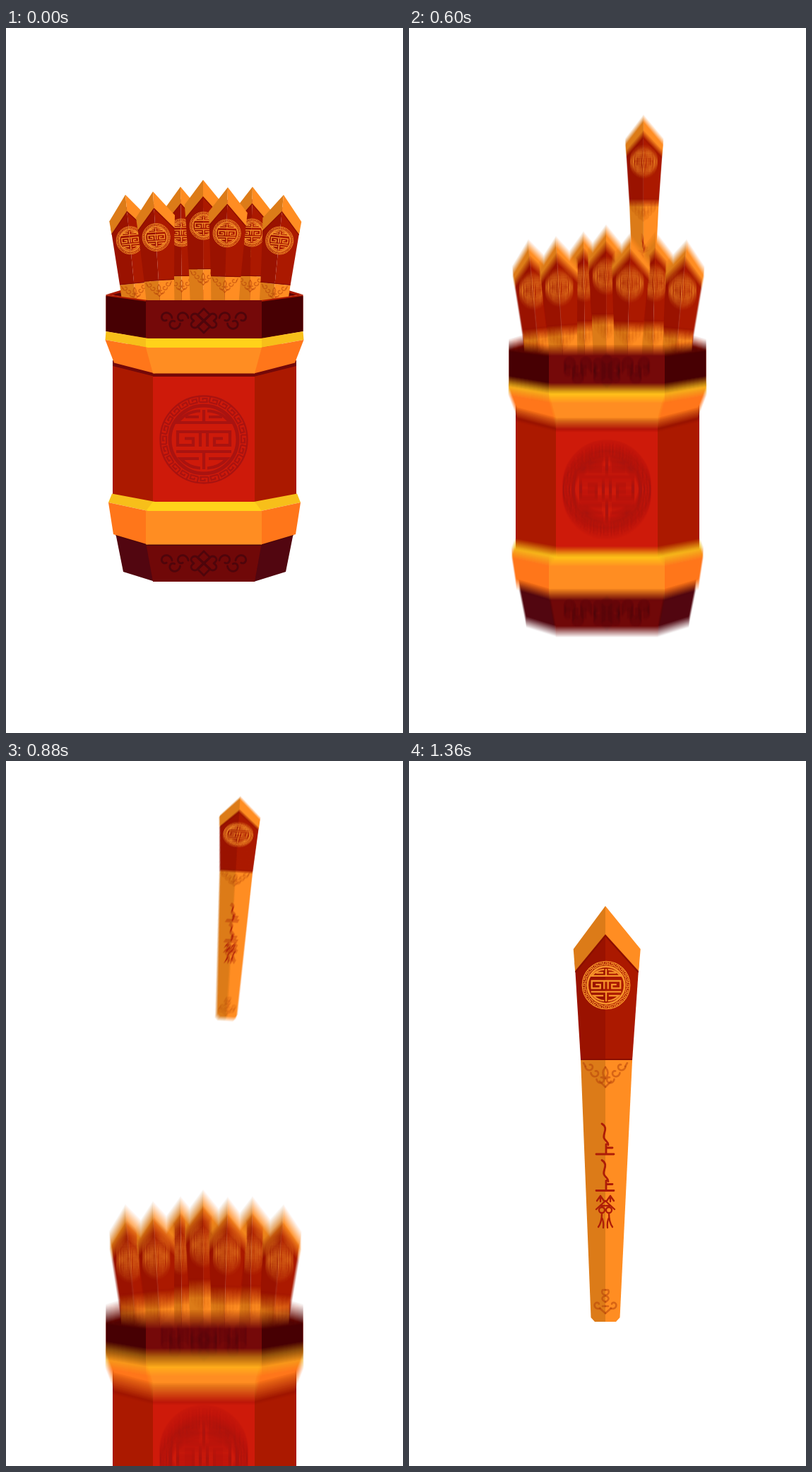
Animation of 562 by 997 pixels, one loop 2400 ms. Source, as an HTML page with a canvas:

```html
<!DOCTYPE html>
<html lang="zh">
<head>
<meta charset="utf-8">
<title>Fortune sticks</title>
<style>
html, body { margin: 0; width: 100%; height: 100%; overflow: hidden; background: #fff; }
canvas { display: block; width: 562px; height: 997px; }
</style>
</head>
<body>
<canvas id="stage" width="562" height="997" role="img" aria-label="上上簽"></canvas>
<script>
const W = 562, H = 997, LOOP = 2400, STEP = 40, SHUTTER = 20, SAMPLES = 14;
const MOVE_START = 240, MOVE_END = 1360;
const STICK_LENGTH = 588;
const RED = '#ab1900', ORANGE = '#ff8d22', SHADE = '#dc7b18', MAROON = '#750909';

function layer(w, h) {
  const c = document.createElement('canvas');
  c.width = w;
  c.height = h;
  return c.getContext('2d');
}

function poly(g, color, ...points) {
  g.fillStyle = color;
  g.beginPath();
  for (const [x, y] of points) g.lineTo(x, y);
  g.closePath();
  g.fill();
}

function pen(g, color, width, cap = 'round') {
  g.strokeStyle = color;
  g.lineWidth = width;
  g.lineCap = cap;
  g.lineJoin = cap === 'round' ? 'round' : 'miter';
}

const line = (g, d) => g.stroke(new Path2D(d));

function bothSides(g, draw) {
  for (const side of [1, -1]) {
    g.save();
    g.scale(side, 1);
    draw();
    g.restore();
  }
}

// Spiral that winds inwards
function curl(g, x, y, r, from, sweep) {
  g.beginPath();
  for (let k = 0; k <= 1; k += 0.05) {
    const a = from + sweep * k, q = r * (1 - 0.65 * k);
    g.lineTo(x + q * Math.cos(a), y + q * Math.sin(a));
  }
  g.stroke();
}

// Round longevity emblem, designed at radius 63
function emblem(g, x, y, r, color) {
  g.save();
  g.translate(x, y);
  g.scale(r / 63, r / 63);
  for (const [radius, width] of [[61.5, 2.4], [48, 5]]) {
    pen(g, color, width);
    g.beginPath();
    g.arc(0, 0, radius, 0, 7);
    g.stroke();
  }
  pen(g, color, 2.2, 'butt');
  for (let i = 0; i < 24; i++) {
    g.rotate(Math.PI / 12);
    line(g, 'M-6.5 -53 H4.5 V-58 H-1.5 V-55.5 M-6.5 -53 V-61');
  }
  pen(g, color, 4.2, 'butt');
  bothSides(g, () => {
    line(g, 'M0 -24 H-37 A41 41 0 0 1 -5 -40.5 M-26 -32 H-7');
    line(g, 'M0 -11 H-37 V8 H-15 V-1.5 H-27 M-5 -11 V10');
    line(g, 'M0 17 H-39 M-7 27 H-33 A41 41 0 0 0 -5 40.5');
  });
  line(g, 'M0 -42 V-24 M0 17 V42');
  g.restore();
}

function knot(g, x, y) {
  g.save();
  g.translate(x, y);
  pen(g, '#4f050b', 2.8);
  bothSides(g, () => {
    line(g, 'M0 -17 L9 -8 L-8 8 Q-13 12 -17 8 Q-20 4 -14 0 Q-20 -4 -17 -8 Q-13 -12 -8 -8 L9 8 L0 17');
    for (let i = 0; i < 3; i++) {
      const up = i % 2 ? 1 : -1;
      curl(g, -31 - 11.5 * i, 4 * up, 9, 0, up * 1.7 * Math.PI);
    }
  });
  g.restore();
}

function inscription(g) {
  g.save();
  pen(g, '#ad1c08', 2.8);
  for (let i = 0; i < 2; i++) {
    line(g, 'M-5 308 C5 314 -4 322 -2 328 C0 333 4 333 4 338 M1 337 V350 M1 342 H10 M-13 351 H12');
    g.translate(0, 51.5);
  }
  g.restore();
  pen(g, '#ad1c08', 2.3);
  bothSides(g, () => {
    line(g, 'M-12 417 L-7 410 L-2 417 M-7 410 V418 M-13 429 L0 417 M-7 424 H-1');
    line(g, 'M-9 430 a4 4 0 0 1 8 0 a4 4 0 0 1 -8 0 M-5 434 Q-5 447 -10 454 M-5 441 Q-2 446 -3 455');
  });
}

// Tip at the origin, axis running down
function stick(g) {
  for (const [side, red, gold] of [[-1, '#9a1200', SHADE], [1, RED, ORANGE]]) {
    const at = (w, y) => [side * w + 2.5 * (1 - y / STICK_LENGTH), y];
    poly(g, red, [0, 30], at(45.5, 80), at(36.5, 218), [0, 218]);
    poly(g, gold, [0, 218], at(36.5, 218), at(20.5, 582), at(15, 588), [0, 588]);
    pen(g, '#8a0f00', 2);
    line(g, `M0 42 L${at(44, 93)} M0 217 L${at(35.5, 217)}`);
    poly(g, gold, [0, 0], at(47.5, 61), at(45, 92), [0, 40]);
  }
  emblem(g, 1, 112, 34.5, '#f6922a');

  pen(g, 'rgba(178,62,8,.5)', 2.6);
  bothSides(g, () => {
    for (let i = 0; i < 3; i++) curl(g, -22 + 8 * i, 227 + 9 * i, 6.5, Math.PI, -1.6 * Math.PI);
    line(g, 'M-31 222 L-28 227 M-8 248 L0 256 M0 228 Q-7 236 0 244');
    curl(g, -11, 564, 6, 0.3 * Math.PI, 1.6 * Math.PI);
    line(g, 'M0 543 H-4 Q-7 548 0 551 Q-9 555 0 560 M-8 569 L0 576 M-4 566 H0');
  });
  inscription(g);
}

function pot(g) {
  // A ring is [outer x, inner x, front y, rise of the outer corner]
  function band([o1, i1, y1, r1], [o2, i2, y2, r2], side, front) {
    for (const m of [x => x, x => 562 - x]) {
      poly(g, side, [m(o1), y1 - r1], [m(i1 + 3), y1], [m(i2 + 3), y2], [m(o2), y2 - r2]);
    }
    poly(g, front, [i1, y1], [560 - i1, y1], [560 - i2, y2], [i2, y2]);
  }
  const rimInside = (color, inset) => poly(g, color,
    [142 + inset, 377], [165 + inset / 3, 370 + inset / 3], [397 - inset / 3, 370 + inset / 3],
    [420 - inset, 377], [361, 386], [198, 386]);

  rimInside(RED, 0);
  rimInside('#5c0508', 9);

  const scale = 0.58;
  function placed(x, y, degrees) {
    g.save();
    g.translate(x, y);
    g.rotate(degrees * Math.PI / 180);
    g.scale(scale, scale);
    stick(g);
    g.restore();
  }
  for (const x of [247, 349]) placed(x, 224.5, (x - 280) * 0.02);
  for (const x of [169, 279, 208, 314, 393]) {
    const d = x - 280;
    placed(x, 212.5 + 2.2 * Math.sqrt(Math.abs(d)), d * 0.05);
  }

  const shoulder = [141.5, 198, 439, 10], upper = [140.5, 198, 452, 11];
  const lower = [145, 198, 683, 12], hem = [152, 198, 730.5, 14.5];
  band([151, 208, 484, 14], [151, 208, 675, 11], RED, '#ce1a0a');
  band([151, 208, 484, 14], [151, 208, 493, 15], '#740808', '#740808');

  band([141.5, 198, 385, 8], shoulder, RED, MAROON);
  band([141.5, 198, 387, 8], shoulder, '#470003', MAROON);
  band(shoulder, upper, '#f7bf1a', '#ffd21a');
  band(upper, [153, 208, 488.5, 15], '#ff761a', ORANGE);

  band([155, 198, 728, 14], [166, 208, 783, 14], '#520610', '#700808');
  band([155, 198, 728, 14], [155.5, 198, 732, 14], '#4a0409', '#4a0409');
  band([150, 208, 670, 11.5], lower, '#f7bf1a', '#ffd21a');
  band(lower, hem, '#ff761a', ORANGE);

  knot(g, 280, 414);
  knot(g, 280, 757);
  emblem(g, 280, 582, 63, '#a91310');
}

const potLayer = layer(W, H);
pot(potLayer);
const stickLayer = layer(120, 604);
stickLayer.translate(60, 0);
stick(stickLayer);

const ctx = document.getElementById('stage').getContext('2d');
const scratch = layer(W, H);

const unit = (t, from, to) => Math.min(1, Math.max(0, (t - from) / (to - from)));
const ease = (t, from, to) => {
  const u = unit(t, from, to);
  return u * u * (3 - 2 * u);
};

// The stick peeps out, leaps free, then falls towards the viewer
function pose(t) {
  const rise = ease(t, 200, 440), leap = ease(t, 550, 757);
  const u = unit(t, 760, 1380), drop = ease(t, 760, 1380);
  const tilt = u ** 1.3 * (1 - u) ** 2;
  const sx = 0.57 - 0.012 * leap + 0.442 * drop;
  return {
    x: 331.5 + 2.5 * leap - 56 * drop + 5 * Math.sin(Math.PI * u),
    y: 250 - 106 * rise - 109 * leap + 170 * drop,
    sx,
    sy: sx * (0.965 + 0.035 * drop - 2.8 * tilt),
    angle: 46 * tilt * Math.PI / 180,
    depth: 1.95 * tilt
  };
}

function drawHero(g, t) {
  const { x, y, sx, sy, angle, depth } = pose(t);
  g.save();
  g.translate(x, y);
  g.rotate(angle);
  if (depth === 0) {
    g.scale(sx, sy);
    stick(g);
  } else {
    // Perspective in thin slices, the lower end being nearer
    const slice = 12, near = v => 1 / (1 - depth * v / STICK_LENGTH);
    for (let v = 0; v < STICK_LENGTH; v += slice) {
      const a = near(v), b = near(v + slice);
      const top = sy * v * a, bottom = sy * (v + slice) * b;
      const w = 60 * sx * (a + b);
      g.drawImage(stickLayer.canvas, 0, v, 120, slice + 1,
        -w / 2, top, w, (bottom - top) * (slice + 1) / slice);
    }
  }
  g.restore();
}

function drawScene(g, t) {
  g.fillStyle = '#fff';
  g.fillRect(0, 0, W, H);
  drawHero(g, t);
  g.drawImage(potLayer.canvas, 0, 809 * ease(t, 440, 1320));
}

// Motion blur: the running mean of several moments within the shutter
function render(t) {
  if (t < MOVE_START) return drawScene(ctx, 0);
  if (t >= MOVE_END) return drawScene(ctx, LOOP);
  for (let i = 0; i < SAMPLES; i++) {
    drawScene(scratch, t + SHUTTER * ((i + 0.5) / SAMPLES - 0.5));
    ctx.globalAlpha = 1 / (i + 1);
    ctx.drawImage(scratch.canvas, 0, 0);
  }
  ctx.globalAlpha = 1;
}

const start = performance.now();
let shown = -1;
function tick() {
  const t = Math.floor((performance.now() - start) % LOOP / STEP) * STEP;
  if (t !== shown) render(shown = t);
  requestAnimationFrame(tick);
}
tick();
</script>
</body>
</html>
```
